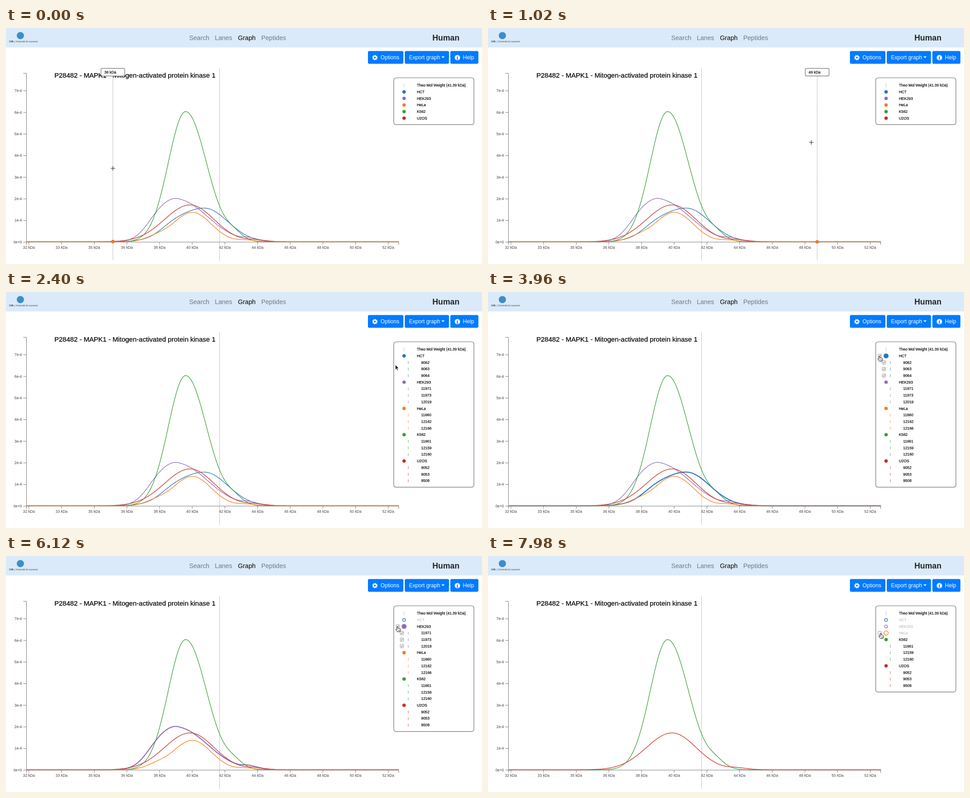
Write an HTML page that moves like this. It is 1060 by 528 pixels and loops after 8000 ms.

```html
<!DOCTYPE html>
<html lang="en">
<head>
<meta charset="utf-8">
<title>Protein mass graph</title>
<style>
  html, body { margin: 0; width: 1060px; height: 528px; overflow: hidden; background: #fff; }
  svg { display: block; font-family: "Liberation Sans", Arial, sans-serif; }
  .nav { font-size: 14.2px; fill: #71797f; }
  .nav .on { fill: #000; }
  .btn rect { fill: #007bff; }
  .btn text { font-size: 12.1px; fill: #fff; }
  .title { font-size: 15.05px; stroke: #000; stroke-width: .25; }
  .axis { stroke: #777; stroke-width: 1; fill: none; }
  .small { font-size: 8.35px; fill: #444; }
  .legend text, #tip text { font-size: 8.35px; fill: #000; stroke: #000; stroke-width: .2; }
  .legend .off { fill: #b5b5b5; stroke: none; }
  .box { fill: #fff; stroke: #707070; stroke-width: 1.2; }
  .check { fill: #fff; stroke: #8a8a8a; stroke-width: .9; }
  .mark { fill: none; stroke: #444; stroke-width: 1; }
  .dots { stroke: #8a8f96; stroke-width: 1; stroke-dasharray: 1.3 1; }
  .curve { fill: none; stroke-width: 1.3; stroke-linejoin: round; }
</style>
</head>
<body>
<svg width="1060" height="528" viewBox="0 0 1060 528">
  <rect width="1060" height="43.5" fill="#daeaf9"/>
  <circle cx="32" cy="17" r="8" fill="#3a8fcb"/>
  <text x="7" y="32" font-size="4.7" fill="#444"><tspan font-weight="bold">UNIL</tspan> | Université de Lausanne</text>
  <g class="nav">
    <text x="408" y="27">Search</text>
    <text x="465" y="27">Lanes</text>
    <text x="516.5" y="27" class="on">Graph</text>
    <text x="568.5" y="27">Peptides</text>
  </g>
  <text x="949.5" y="27.7" font-size="17.8" font-weight="bold" fill="#212529">Human</text>

  <g class="btn">
    <rect x="806" y="51.5" width="79" height="28.5" rx="3"/>
    <g fill="none" stroke="#fff">
      <circle cx="821.5" cy="66.3" r="3.3" stroke-width="2.6"/>
      <circle cx="821.5" cy="66.3" r="5" stroke-width="2.2" stroke-dasharray="1.963"/>
    </g>
    <text x="834" y="69.8">Options</text>
    <rect x="888" y="51.5" width="98.5" height="28.5" rx="3"/>
    <text x="897.5" y="69.8">Export graph</text>
    <path d="M969.5 63.5h7.4l-3.7 3.7z" fill="#fff"/>
    <rect x="989.5" y="51.5" width="62.5" height="28.5" rx="3"/>
    <circle cx="1005.2" cy="66.3" r="6" fill="#fff"/>
    <path d="M1005.2 62.3v1.9M1003.6 65.8h1.7v4M1003.4 69.6h3.7" fill="none" stroke="#007bff" stroke-width="1.6"/>
    <text x="1017.5" y="69.8">Help</text>
  </g>

  <text class="title" x="107.7" y="111.2">P28482 - MAPK1 - Mitogen-activated protein kinase 1</text>
  <g id="axes"></g>
  <path class="dots" d="M475.6 91V521"/>
  <g id="curves"></g>
  <g id="probe">
    <path class="dots" d="M0 99V520"/>
    <g id="spots"></g>
    <g id="tip">
      <rect class="box" x="-26.5" y="90.3" width="53" height="17" rx="3"/>
      <text x="-19" y="102">36 kDa</text>
    </g>
  </g>
  <g id="legend" class="legend"></g>
  <g id="cursor">
    <path id="cross" d="M-5 0H5M0-5V5" stroke="#222" stroke-width="1.1"/>
    <path id="arrow" d="M0 0V10.6L2.5 8.3L4.3 12.4L6 11.6L4.3 7.7H7.6Z" fill="#000" stroke="#fff" stroke-width=".8"/>
    <g id="hand" fill="#fff" stroke="#000" stroke-width=".9" stroke-linejoin="round">
      <path d="M-1.2 .6Q0-1 1.1 .6V4.2Q2.2 3.6 3 4.6Q4.2 4 5 5.2Q6.4 5 6.4 6.4V8.6L5.2 12H-.6L-4.2 7.4Q-4.2 5.6-2.6 6.2L-1.2 7.4Z"/>
      <path d="M1.2 7.6V10M3 7.6V10M4.6 7.6V10" stroke-width=".6"/>
    </g>
  </g>
</svg>
<script>
const LOOP = 8000, STEP = 60;
const LEFT = 46, RIGHT = 875, BASE = 478.4;
const EXPAND = 1860;
const FIRST_ROW = 128.2, ROW = 14.7;
const byId = id => document.getElementById(id);
const rowY = n => FIRST_ROW + ROW * n;
const massAt = x => 10 ** (1.5 + (x - 51) / 72.75 * .02);

// Each curve is a sum of bells: centre, height, left width, right width
const groups = [
  { name: 'HCT', color: '#2a75be', ids: [9062, 9063, 9064],
    bells: [[443, 74.8, 60, 51], [370, 12, 28, 30]] },
  { name: 'HEK293', color: '#8f6dba', ids: [11971, 11973, 12019],
    bells: [[384, 93, 42, 65], [333, 20.5, 27, 27], [542, 5.5, 14, 20]] },
  { name: 'HeLa', color: '#f47d20', ids: [11660, 12162, 12166],
    bells: [[415, 66, 44, 42], [332, 6.8, 24, 20], [535, 3.5, 18, 22]] },
  { name: 'K562', color: '#34a036', ids: [11661, 12159, 12160],
    bells: [[400, 291.4, 38.7, 46.5], [508, 13, 18, 20]] },
  { name: 'U2OS', color: '#cb2d24', ids: [9052, 9053, 9508],
    bells: [[410, 82.6, 57, 53.3], [555, 3.5, 18, 25]] }
];
const drawOrder = [0, 1, 3, 4, 2].map(i => groups[i]);

// The first three groups are unticked one after another
const isOn = (i, t) => i > 2 || t < 4650 + 1500 * i;

const curveY = (bells, x) => bells.reduce((y, [mid, height, left, right]) =>
  y - height * Math.exp(-(((x - mid) / (x < mid ? left : right)) ** 2) / 2), BASE);

// Pointer stops: time, x, y
const stops = [
  [0, 238, 314], [60, 238, 314], [840, 759, 261], [1020, 720, 256], [EXPAND, 866, 185], [2400, 867, 163],
  [3600, 872, 143], [4740, 872, 143], [5160, 886, 155], [5800, 872, 157.5], [6400, 872, 157.5],
  [6960, 877.5, 170.5], [7400, 874.5, 172.5], [LOOP, 874.5, 172.5]
];

function pointer(t) {
  const i = Math.max(1, stops.findIndex(s => s[0] >= t));
  const [t0, x0, y0] = stops[i - 1], [t1, x1, y1] = stops[i];
  const k = (t - t0) / (t1 - t0);
  return [x0 + (x1 - x0) * k, y0 + (y1 - y0) * k];
}

function drawAxes() {
  let s = `<path class="axis" d="M38.5 101.3H45.5V479M45.5 485V479H874.5V485"/>`;
  for (let i = 0; i < 12; i++) {
    const x = 51 + i * 72.75;
    s += `<path class="axis" d="M${x} 479v5.5"/>
      <text class="small" x="${x}" y="494" text-anchor="middle">${Math.round(massAt(x))} kDa</text>`;
  }
  for (let i = 0; i < 8; i++) {
    const y = 479 - i * 48.35;
    s += `<path class="axis" d="M38.5 ${y}h7"/>
      <text class="small" x="35.5" y="${y + 2.8}" text-anchor="end">${i ? i + 'e-4' : '0e+0'}</text>`;
  }
  byId('axes').innerHTML = s;
}

function drawCurves() {
  let lines = '', spots = '';
  for (const g of drawOrder) {
    const pts = [];
    for (let x = LEFT; x <= RIGHT; x++) pts.push(`${x} ${curveY(g.bells, x).toFixed(2)}`);
    lines += `<path class="curve" stroke="${g.color}" d="M${pts.join('L')}"/>`;
    spots += `<circle r="3.4" fill="${g.color}"/>`;
  }
  byId('curves').innerHTML = lines;
  byId('spots').innerHTML = spots;
  drawOrder.forEach((g, i) => {
    g.line = byId('curves').children[i];
    g.spot = byId('spots').children[i];
  });
}

// Which group each legend row belongs to; row 0 is the theoretical weight
function legendRows(t) {
  const rows = [-1];
  groups.forEach((g, i) => {
    const count = t >= EXPAND && isOn(i, t) ? 1 + g.ids.length : 1;
    for (let k = 0; k < count; k++) rows.push(i);
  });
  return rows;
}

const checkbox = (x, y, on) =>
  `<rect class="check" x="${x - 3.8}" y="${y - 3.8}" width="7.6" height="7.6" rx="1"/>` +
  (on ? `<path class="mark" d="M${x - 2} ${y}l1.5 1.8l2.6-3.8"/>` : '');

function groupRow(g, y, on, over) {
  const dot = on
    ? `r="${over ? 5.5 : 3.8}" fill="${g.color}"`
    : `r="${over ? 4.8 : 3.2}" fill="#fff" stroke="${g.color}" stroke-width="1.4"`;
  return `<circle cx="886.5" cy="${y}" ${dot}/>
    <text x="915" y="${y + 3}" class="${on ? '' : 'off'}">${g.name}</text>` +
    (over ? checkbox(872.4, y, on) : '');
}

function sampleRow(g, id, y, over) {
  return `<path d="M895.8 ${y - 2.8}v6" stroke="${g.color}" opacity=".8"/>
    <text x="924.5" y="${y + 3}">${id}</text>` + (over ? checkbox(881.8, y, true) : '');
}

function drawLegend(rows, hovered, t) {
  let s = `<rect class="box" x="863.5" y="111.5" width="178.5" height="${16.5 + ROW * rows.length}" rx="5"/>
    <path d="M886.5 124v8.5" stroke="#ccc" stroke-width="1.3"/>
    <text x="915" y="131.2">Theo Mol Weight (41.39 kDa)</text>`;
  rows.forEach((i, n) => {
    if (!n) return;
    const g = groups[i], over = i === hovered, k = n - rows.indexOf(i);
    s += k ? sampleRow(g, g.ids[k - 1], rowY(n), over) : groupRow(g, rowY(n), isOn(i, t), over);
  });
  byId('legend').innerHTML = s;
}

const show = (el, on) => el.style.display = on ? '' : 'none';
const place = (el, x, y) => el.setAttribute('transform', `translate(${x.toFixed(2)} ${y.toFixed(2)})`);
let lastKey = '';

function render(t) {
  const open = t >= EXPAND, [x, y] = pointer(t);
  const rows = legendRows(t);
  const hovered = open && x > 868 ? rows[Math.round((y - FIRST_ROW) / ROW)] : -1;

  const key = rows + '|' + hovered;
  if (key !== lastKey) {
    lastKey = key;
    drawLegend(rows, hovered, t);
    groups.forEach((g, i) => {
      show(g.line, isOn(i, t));
      g.line.style.strokeWidth = i === hovered ? 2.2 : 1.3;
    });
  }

  const hand = hovered >= 0 && x < 876;
  place(byId('cursor'), x, y);
  show(byId('cross'), !open);
  show(byId('hand'), hand);
  show(byId('arrow'), open && !hand);

  // The probe line trails the pointer by one step
  show(byId('probe'), !open);
  if (!open) {
    const px = pointer(Math.max(0, t - STEP))[0];
    place(byId('probe'), px, 0);
    byId('tip').lastElementChild.textContent = Math.round(massAt(px)) + ' kDa';
    for (const g of groups) g.spot.setAttribute('cy', curveY(g.bells, px).toFixed(2));
  }
}

drawAxes();
drawCurves();
const start = performance.now();
function tick() {
  const t = Math.max(0, performance.now() - start) % LOOP;
  render(Math.floor(t / STEP) * STEP);
  requestAnimationFrame(tick);
}
tick();
</script>
</body>
</html>
```
